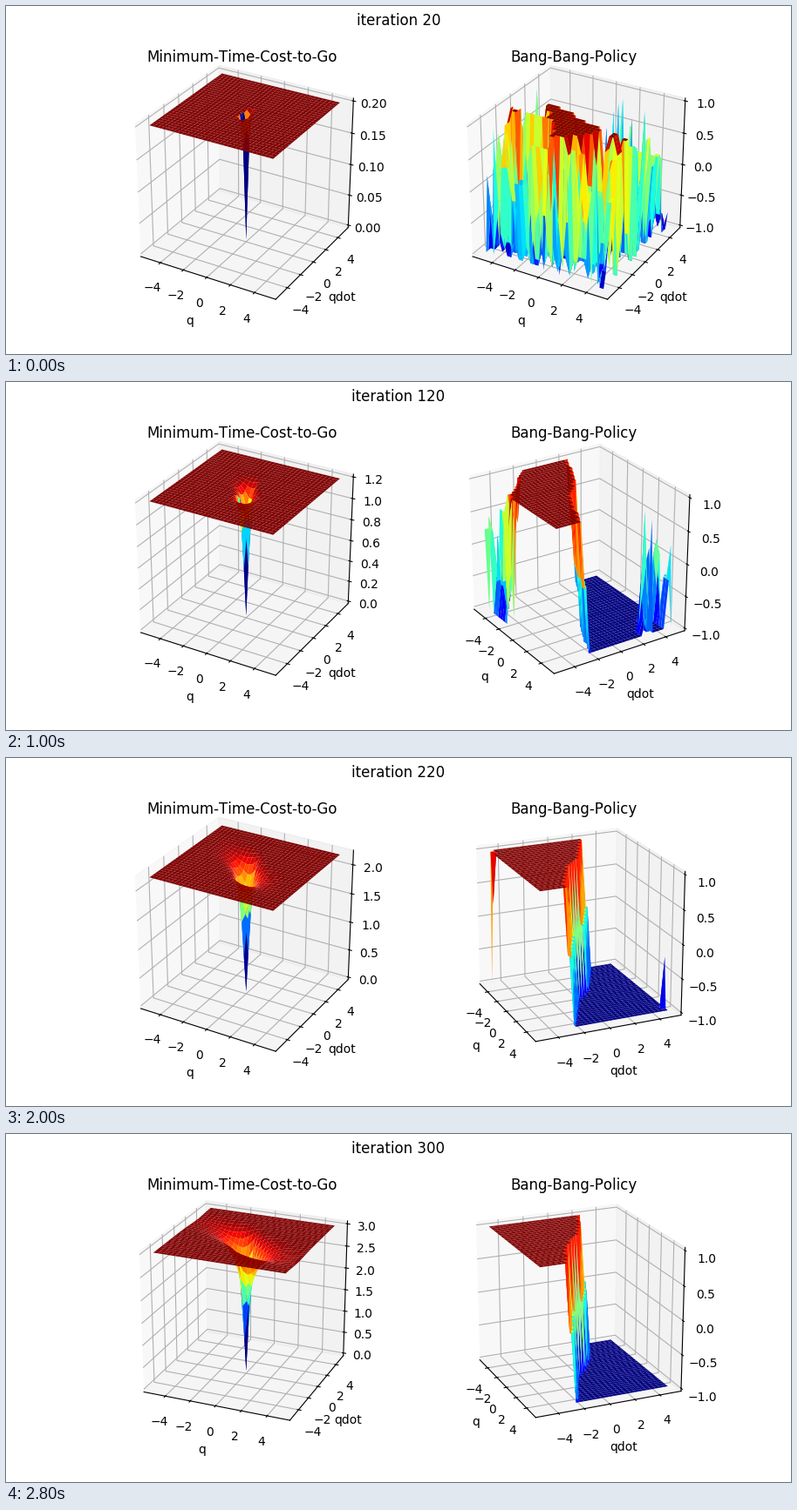
Recreate the animation shown at these times as a matplotlib script. Size 900 px wide and 400 px high, loop 3 s.

```python
import numpy as np
import matplotlib.pyplot as plt
from matplotlib.animation import FuncAnimation
from mpl_toolkits.mplot3d import Axes3D

DT = 0.01
EVERY = 20
FRAMES = 15
SPAN = 5.0
PAD = 1 / 48
HOME = (30, -60)

plt.rcParams["text.kerning_factor"] = 6

grid = np.linspace(-SPAN, SPAN, 31)
inputs = np.linspace(-1, 1, 9)
Q, QDOT = np.meshgrid(grid, grid)


def locate(x):
    """Upper cell index and relative position inside the cell."""
    x = np.clip(x, grid[0], grid[-1])
    hi = np.clip(np.searchsorted(grid, x), 1, len(grid) - 1)
    lo = grid[hi - 1]
    return hi, (x - lo) / (grid[hi] - lo)


def step(q, v, u):
    """One third-order Runge-Kutta step of q'' = u."""
    h = DT / 6
    v_half = v + DT / 2 * u
    v_full = v - DT * u + 2 * DT * u
    return (q + h * v + 4 * h * v_half + h * v_full,
            v + h * u + 4 * h * u + h * u)


def solve():
    """Value iteration for the minimum-time double integrator."""
    q, v = Q[..., None], QDOT[..., None]
    q_next, v_next = step(q, v, inputs)
    qi, qr = locate(q_next)
    vi, vr = locate(v_next)
    big, small = np.maximum(qr, vr), np.minimum(qr, vr)
    q_first = qr >= vr
    q_mid = np.where(q_first, qi, qi - 1)
    v_mid = np.where(q_first, vi - 1, vi)
    step_cost = np.where(q * q + v * v < 0.05, 0.0, DT)

    # Rounding decides between equal inputs, so the order of the sum matters.
    cost = np.zeros_like(Q)
    history = []
    for n in range(1, EVERY * FRAMES + 1):
        total = step_cost + small * cost[vi, qi]
        total = total + (big - small) * cost[v_mid, q_mid]
        total = total + (1 - big) * cost[vi - 1, qi - 1]
        best = total.argmin(axis=-1)
        cost = total.min(axis=-1)
        if n % EVERY == 0:
            history.append((cost, inputs[best]))
    return history


class CubeAxes(Axes3D):
    """3D axes that fill their whole subplot."""

    def apply_aspect(self, position=None):
        pass


def padded(lo, hi):
    d = (hi - lo) * PAD
    return lo - d, hi + d


def make_axes(k, title):
    ax = fig.add_subplot(1, 2, k, axes_class=CubeAxes)
    ax.set_box_aspect((1, 1, 1), zoom=np.sqrt(3) / 1.8294640721620434)
    ax.set_xlabel("q")
    ax.set_ylabel("qdot")
    ax.set_xticks(range(-4, 5, 2))
    ax.set_yticks(range(-4, 5, 2))
    box = ax.get_position()
    fig.text((box.x0 + box.x1) / 2, 0.8393, title, fontsize=12, ha="center")
    return ax


def tick_step(top):
    """Smallest round step that gives at most seven intervals."""
    raw = top / 7 - 1e-9
    mag = 10 ** np.floor(np.log10(raw))
    return next(s * mag for s in (1, 2, 2.5, 5, 10) if s * mag >= raw)


def show(ax, data, lo, hi, gap, view):
    for old in list(ax.collections):
        old.remove()
    ax.plot_surface(Q, QDOT, data, rstride=1, cstride=1, cmap="jet")
    ticks = lo + gap * np.arange(int((hi - lo) / gap + 1e-6) + 1)
    digits = 1 if abs(gap * 10 - round(gap * 10)) < 1e-6 else 2
    labels = [f"{t:.{digits}f}".replace("-", "\u2212") for t in ticks]
    ax.set_zticks(ticks, labels)
    limit = padded(-1.1 * SPAN, 1.1 * SPAN)
    ax.set_xlim(*limit)
    ax.set_ylim(*limit)
    ax.set_zlim(*padded(lo, hi))
    ax.view_init(*view)


def cost_view(i):
    return {13: (29.5, -63.5), 14: (24.5, -67.4)}.get(i, HOME)


def policy_view(i):
    if i < 5:
        return HOME
    return {5: (27, -33), 6: (23.5, -27)}.get(i, (21.3, -23.5))


def update(i):
    n = (i + 1) * EVERY
    cost, policy = history[i]
    top = n * DT
    heading.set_text(f"iteration {n}")
    show(cost_ax, cost, 0, top, tick_step(top), cost_view(i))
    show(policy_ax, policy, -1, 1, 0.5, policy_view(i))
    return []


history = solve()
fig = plt.figure(figsize=(9, 4), dpi=100)
heading = fig.suptitle("")
cost_ax = make_axes(1, "Minimum-Time-Cost-to-Go")
policy_ax = make_axes(2, "Bang-Bang-Policy")

anim = FuncAnimation(fig, update, frames=FRAMES, interval=200,
                     init_func=lambda: update(0), repeat=True, repeat_delay=0)
plt.show()
```
